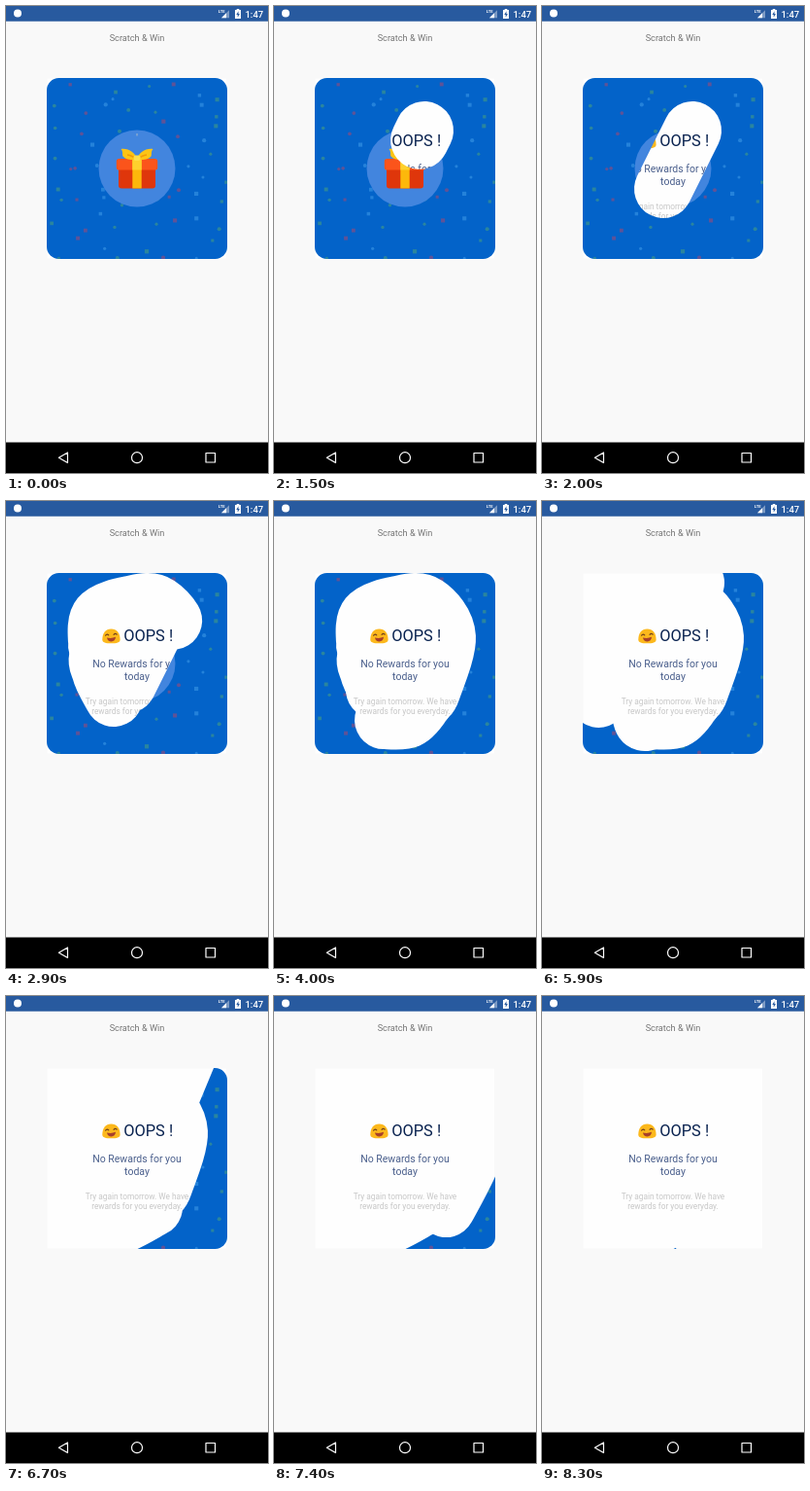
An HTML page for the animation above (10 s loop, 270 px wide and 480 px high).

```html
<!DOCTYPE html>
<html lang="en">
<head>
<meta charset="utf-8">
<title>Scratch card</title>
<style>
  html, body { margin: 0; width: 100%; height: 100%; overflow: hidden; background: #f9f9f9; }
  svg { display: block; width: 100vw; height: 100vh; }
  text { font-family: Roboto, "Noto Sans", sans-serif; }
</style>
</head>
<body>
<svg viewBox="0 0 270 480">
  <defs>
    <mask id="uncleared" maskUnits="userSpaceOnUse" x="40" y="72" width="190" height="190">
      <rect x="40" y="72" width="190" height="190" fill="#fff"/>
      <g id="scratches" fill="none" stroke="#000" stroke-width="60" stroke-linecap="round" stroke-linejoin="round"></g>
    </mask>
    <clipPath id="card"><rect x="42" y="74" width="186" height="186" rx="12.5"/></clipPath>
  </defs>

  <rect width="270" height="480" fill="#f9f9f9"/>

  <!-- status bar -->
  <rect width="270" height="15.75" fill="#285a9f"/>
  <g fill="#fff">
    <circle cx="12" cy="7.6" r="4"/>
    <text x="218.8" y="6.6" font-size="4.2" font-weight="700">LTE</text>
    <path d="M222 12.3 L230 4.3 V12.3 Z" fill-opacity=".4"/>
    <path d="M222 12.3 L227 7.3 V12.3 Z"/>
    <path d="M236 4 h1.7 v-1 h2.6 v1 h1.7 v9 h-6 Z"/>
    <path d="M239.5 5.2 L237.3 8.9 H238.7 V11.7 L240.9 7.9 H239.5 Z" fill="#285a9f"/>
    <text x="265.2" y="11.6" font-size="9.5" font-weight="500" text-anchor="end">1:47</text>
  </g>

  <text x="135" y="35.8" font-size="9.19" fill="#757575" text-anchor="middle">Scratch &amp; Win</text>

  <!-- message under the foil -->
  <rect x="42.5" y="74.5" width="184.5" height="185" fill="#fefefe"/>
  <g>
    <path d="M99.3 142.5 C99.3 136 102.5 131.5 108.4 131.5 C114.3 131.5 117.6 136 117.6 142.5 C117.6 145.6 114 146.3 108.4 146.3 C102.8 146.3 99.3 145.6 99.3 142.5 Z" fill="#fcb81c"/>
    <path d="M102.6 138.2 q1.6 -2 3.2 -.4 M111 137.4 q1.6 -2 3.2 -.2" fill="none" stroke="#70401c" stroke-width="1.1" stroke-linecap="round"/>
    <path d="M104 140.4 Q108.5 141.6 113 139.8 C112.8 143 111 144.4 108.6 144.4 C106.2 144.4 104.4 143 104 140.4 Z" fill="#a8402a"/>
  </g>
  <text x="121.2" y="144.4" font-size="16.4" fill="#0a2350">OOPS !</text>
  <g text-anchor="middle">
    <g font-size="10.5" fill="#4a5f8c">
      <text x="135" y="171.4">No Rewards for you</text>
      <text x="135" y="183.7">today</text>
    </g>
    <g font-size="8.3" fill="#c6c6c6">
      <text x="135" y="209">Try again tomorrow. We have</text>
      <text x="135" y="218.7">rewards for you everyday.</text>
    </g>
  </g>

  <!-- foil -->
  <g mask="url(#uncleared)">
    <g clip-path="url(#card)">
      <rect x="42" y="74" width="186" height="186" fill="#0363c9"/>
      <g id="confetti" opacity=".45"></g>
      <circle cx="135" cy="167" r="39.5" fill="#4285de"/>
      <path d="M135 131 v2.5" stroke="#a9b8c8" stroke-width="1"/>
      <path d="M116 167 H154 V184.5 Q154 187.5 151 187.5 H119 Q116 187.5 116 184.5 Z" fill="#df360b"/>
      <rect x="113.8" y="157" width="42.4" height="11.5" rx="2.6" fill="#fb541b"/>
      <rect x="130.3" y="157" width="9.4" height="30.5" fill="#fdb80b"/>
      <rect x="130.3" y="157" width="9.4" height="11.5" fill="#fed02d"/>
      <path d="M135 158 C133 150 126 146 118.5 147 C121 150 119.5 152 120.5 154.5 C124 158.5 130 158 135 158 Z" fill="#fdc414"/>
      <path d="M135 158 C137 150 144 146 151.5 147 C149 150 150.5 152 149.5 154.5 C146 158.5 140 158 135 158 Z" fill="#fdc414"/>
      <path d="M135 158 Q130 153.5 125 153 M135 158 Q140 153.5 145 153" fill="none" stroke="#f39a06" stroke-width="1.3"/>
      <rect x="131.5" y="153.5" width="7" height="5.5" rx="2" fill="#fede4a"/>
    </g>
  </g>

  <!-- navigation bar -->
  <rect y="448.5" width="270" height="31.5" fill="#000"/>
  <g fill="none" stroke="#fff" stroke-width="1.2" stroke-linejoin="round">
    <path d="M63.5 459 V469.4 L54.4 464.2 Z"/>
    <circle cx="135" cy="464.2" r="5.5"/>
    <rect x="206" y="459.5" width="9.5" height="9.5"/>
  </g>
</svg>

<script>
const LOOP = 10000, STEP = 100;
const byId = id => document.getElementById(id);

// Finger strokes: first step, last step, key points of a smooth path.
const strokes = [
  [1500, 2000, "155,128 125,188"],
  [2100, 2500, "157,123 100,155 98,176 111,202"],
  [2700, 3100, "94,148 97,119 128,107 157,107 178,140 162,196"],
  [3600, 3800, "104,194 160,200"],
  [4000, 4000, "154,207 138,224 113,225"],
  [4100, 4200, "113,225 104,226 101,208"],
  [4600, 4900, "84,100 82,76 62,92 64,168"],
  [5200, 5300, "55,150 55,168"],
  [5500, 6300, "158,84 112,90 62,190 62,244 110,238 152,217"],
  [6500, 6700, "112,241 187,61"],
  [6800, 6800, "190,70 206,88"],
  [7100, 7600, "205,122 204,165 165,242 181,232"],
  [7900, 7900, "207,205 192,235"],
  [8100, 8300, "196,234 214,246"]
].map(([start, end, keys]) => ({ start, end, path: addScratch(keys) }));

// Catmull-Rom spline through the key points, as cubic Béziers.
function smoothPath(keys) {
  const points = keys.split(" ").map(key => key.split(",").map(Number));
  const at = i => points[Math.max(0, Math.min(points.length - 1, i))];
  const control = (i, side) => at(i).map((v, axis) => v + side * (at(i + 1)[axis] - at(i - 1)[axis]) / 6);
  const curves = points.slice(1).map((p, i) => `C${control(i, 1)} ${control(i + 1, -1)} ${p}`);
  return `M${points[0]} ${curves.join(" ")}`;
}

function addScratch(keys) {
  const path = document.createElementNS("http://www.w3.org/2000/svg", "path");
  path.setAttribute("d", smoothPath(keys));
  path.setAttribute("pathLength", 1);
  byId("scratches").append(path);
  return path;
}

function seededRandom(seed) {
  return () => (seed = seed * 16807 % 2147483647) / 2147483647;
}

// One piece of confetti somewhere in each cell of a grid.
function drawConfetti() {
  const random = seededRandom(47), cells = 8, size = 186 / cells;
  const colors = ["#5cb06c", "#d0405c", "#4fa8f0", "#5cb06c"];
  let pieces = "";
  for (let i = 0; i < cells * cells; i++) {
    const x = 42 + (i % cells + random()) * size;
    const y = 74 + (Math.floor(i / cells) + random()) * size;
    const side = 3 + random() * 1.3;
    const round = random() < 0.6 ? side / 2 : 0;
    pieces += `<rect x="${x - side / 2}" y="${y - side / 2}" width="${side}" height="${side}" rx="${round}" fill="${colors[i % 4]}"/>`;
  }
  byId("confetti").innerHTML = pieces;
}

function render(time) {
  const now = Math.floor(time / STEP) * STEP;
  for (const { start, end, path } of strokes) {
    const progress = Math.min(1, (now - start + STEP) / (end - start + STEP));
    path.style.display = now < start ? "none" : "";
    path.setAttribute("stroke-dasharray", `${Math.max(0, progress)} 2`);
  }
}

function tick() {
  render(performance.now() % LOOP);
  requestAnimationFrame(tick);
}

drawConfetti();
tick();
</script>
</body>
</html>
```
